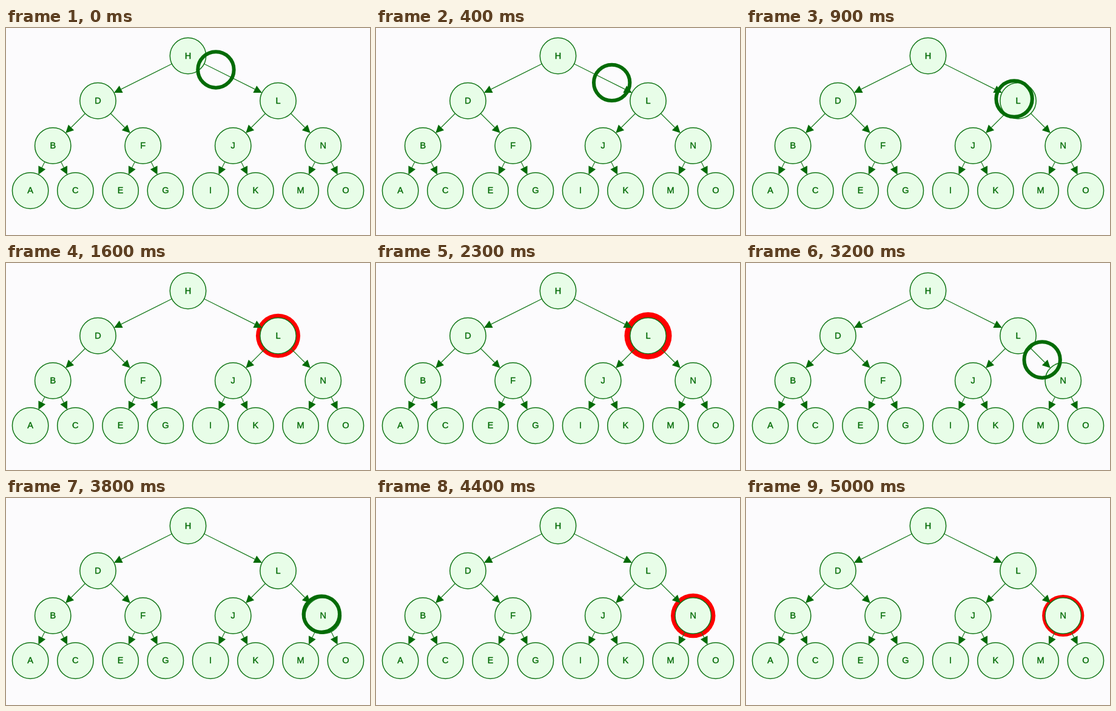
An HTML page that plays this animation: 600 by 342 pixels, repeating every 5100 ms.

```html
<!DOCTYPE html>
<html lang="en">
<head>
<meta charset="utf-8">
<title>Binary tree search</title>
<style>
  html, body { margin: 0; width: 100%; height: 100%; overflow: hidden; background: #fcfbfd; }
  svg { display: block; width: 600px; height: 342px; filter: blur(0.5px); }
  text { font: 14.6px "Liberation Sans", Arial, sans-serif; text-anchor: middle; fill: #036b06; stroke: #036b06; stroke-width: 0.4; }
  .node { fill: #e8fde8; stroke: #107515; stroke-width: 1.5; }
  .edge { stroke: #187a1d; stroke-width: 1.2; }
  .head { fill: #036b06; }
  #ring { fill: none; stroke: #036b06; stroke-width: 6; }
  #glow { fill: #ff0000; }
</style>
</head>
<body>
<svg id="stage" viewBox="0 0 600 342">
  <circle id="glow"/>
  <g id="nodes"></g>
  <g id="edges"></g>
  <circle id="ring"/>
</svg>
<script>
const LOOP = 5100, STEP = 100;
const SCALE = 1.485, R = 20 * SCALE, GAP = 50 * SCALE;
const MOVE = 1390, PULSE = 4200, PULSE_LOW = 928;
const $ = id => document.getElementById(id);

function add(parent, tag, attrs) {
  const el = document.createElementNS("http://www.w3.org/2000/svg", tag);
  set(el, attrs);
  return parent.appendChild(el);
}

function set(el, attrs) {
  for (const key in attrs) el.setAttribute(key, attrs[key]);
}

// Nodes level by level; the children of i are 2i + 1 and 2i + 2.
const tree = [..."HDLBFJNACEGIKMO"].map((label, i) => {
  const level = Math.floor(Math.log2(i + 1));
  const count = 2 ** level;
  const col = i + 1 - count;
  return {
    label,
    x: 300 + (col - (count - 1) / 2) * GAP * 8 / count,
    y: 46 + level * GAP
  };
});
const at = label => tree.find(n => n.label === label);

function drawEdge(a, b) {
  const len = Math.hypot(b.x - a.x, b.y - a.y);
  const ux = (b.x - a.x) / len, uy = (b.y - a.y) / len;
  const tipX = b.x - ux * R, tipY = b.y - uy * R;
  const half = 4.4 * SCALE;
  const baseX = tipX - ux * half * 2, baseY = tipY - uy * half * 2;
  add($("edges"), "line", { class: "edge", x1: a.x + ux * R, y1: a.y + uy * R, x2: baseX, y2: baseY });
  add($("edges"), "polygon", {
    class: "head",
    points: [tipX, tipY, baseX - uy * half, baseY + ux * half, baseX + uy * half, baseY - ux * half].join(" ")
  });
}

tree.forEach((n, i) => {
  add($("nodes"), "circle", { class: "node", cx: n.x, cy: n.y, r: R });
  add($("nodes"), "text", { x: n.x, y: n.y + 4.7 }).textContent = n.label;
  if (i) drawEdge(tree[(i - 1) >> 1], n);
});

const moves = [
  { from: at("H"), to: at("L"), start: -430 },
  { from: at("L"), to: at("N"), start: 2457 }
];

// The highlight grows and shrinks as a triangle wave.
function glowRadius(t) {
  const phase = (((t - PULSE_LOW) / PULSE) % 1 + 1) % 1;
  return R + (3 + 5 * (1 - Math.abs(2 * phase - 1))) * SCALE;
}

function render(t) {
  const { from, to, start } = t < moves[1].start ? moves[0] : moves[1];
  const p = (t - start) / MOVE;
  const moving = p < 1;
  $("ring").style.display = moving ? "" : "none";
  $("glow").style.display = moving ? "none" : "";
  if (moving) {
    set($("ring"), { cx: from.x + (to.x - from.x) * p, cy: from.y + (to.y - from.y) * p, r: R });
  } else {
    set($("glow"), { cx: to.x, cy: to.y, r: glowRadius(t) });
  }
}

const begin = performance.now();
function tick() {
  const t = Math.max(0, performance.now() - begin) % LOOP;
  render(Math.floor(t / STEP) * STEP);
  requestAnimationFrame(tick);
}
tick();
</script>
</body>
</html>
```
